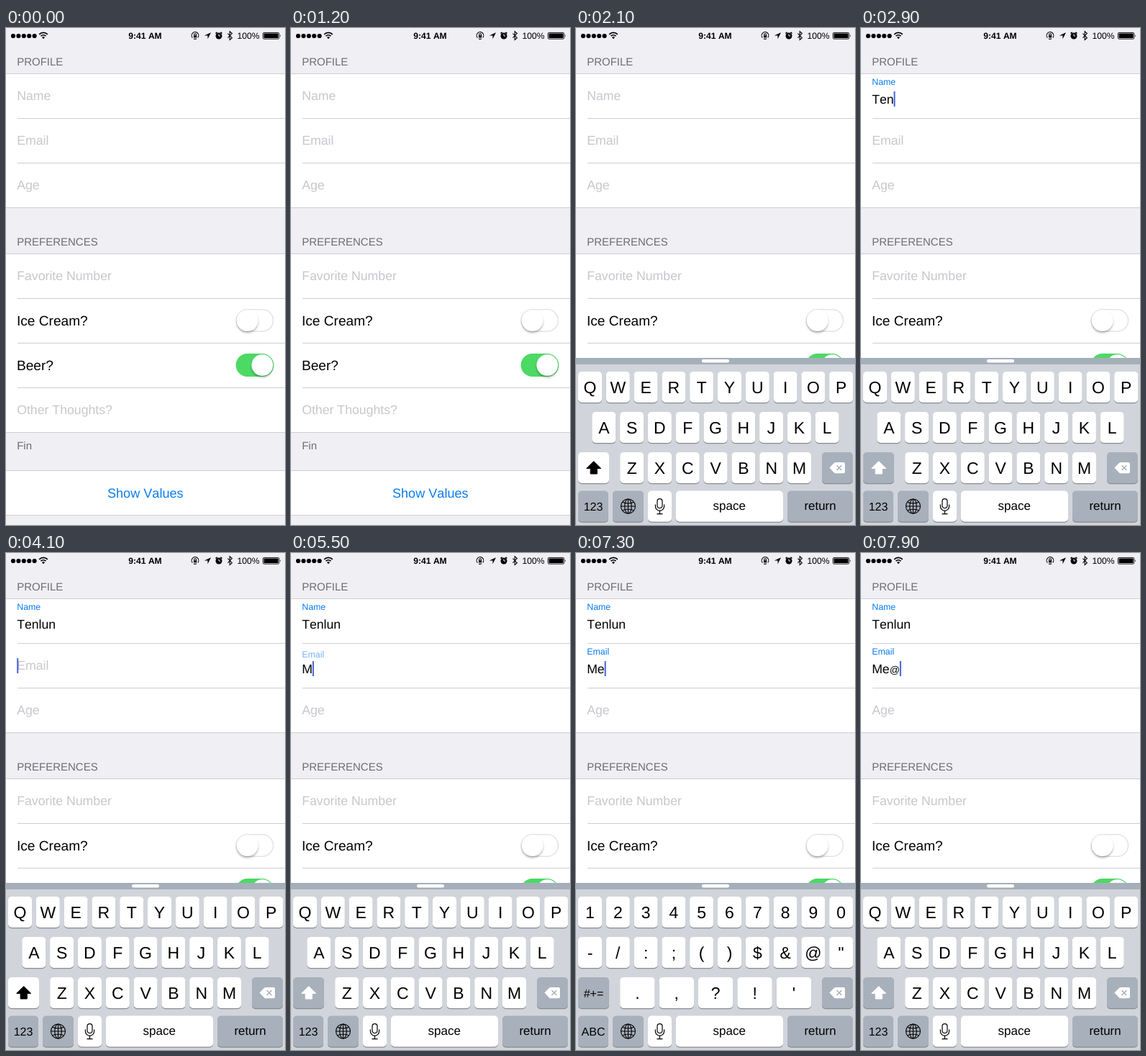
Write an HTML page that moves like this. It is 388x690 px and loops after 8 s.

```html
<!DOCTYPE html>
<html lang="en">
<head>
<meta charset="utf-8">
<title>Form with floating labels</title>
<style>
html, body { margin: 0; width: 100%; height: 100%; overflow: hidden; background: #efeff4; }
svg { display: block; width: 100vw; height: 100vh; }
text { font-family: "Liberation Sans", Arial, sans-serif; font-kerning: none; text-rendering: geometricPrecision; white-space: pre; }
</style>
</head>
<body>
<svg id="stage" viewBox="0 0 388 690"></svg>
<script>
const LOOP = 8000;
const KEY_W = 33, KEY_H = 43, PITCH = 38.8;
const ROWS = [477, 533, 589, 642.5];
const KEY_DARK = '#a8b0bb', BLUE = '#0a7cf0';

const clamp = v => Math.max(0, Math.min(1, v));
const $ = id => document.getElementById(id);
const label = (x, y, size, fill, str, extra = '') =>
  `<text x="${x}" y="${y}" font-size="${size}" fill="${fill}" ${extra}>${str}</text>`;
const box = (x, y, w, h, fill, extra = '') =>
  `<rect x="${x}" y="${y}" width="${w}" height="${h}" fill="${fill}" ${extra}/>`;
const middle = 'text-anchor="middle"';
const escape = c => c.replace('&', '&amp;').replace('"', '&quot;');

// Status bar
function statusBar() {
  const dots = [0, 1, 2, 3, 4].map(i => `<circle cx="${10 + i * 7.4}" cy="11" r="3.1"/>`).join('');
  return `<g fill="#000">${dots}
    <path d="M52 15.2l-2-2.3a3 3 0 0 1 4 0z"/>
    <g fill="none" stroke="#000" stroke-width="1.7">
      <path d="M48.5 11.2a5 5 0 0 1 7 0M46.2 8.8a8.2 8.2 0 0 1 11.6 0"/>
      <path stroke-width="1.1" d="M259.4 13.6a4.8 4.8 0 1 1 7.4-.3M265 14.8a4.8 4.8 0 0 1-4 .3M261.7 10.5v-1.3a1.4 1.4 0 0 1 2.8 0v1.3"/>
      <path stroke-width="1.1" d="M308.4 7.7l6 6-3.2 2.8V4.8l3.2 2.8-6 6"/>
      <path stroke-width="1.5" d="M291.6 7.6l2-1.9M300.4 7.6l-2-1.9"/>
    </g>
    <rect x="261" y="10.2" width="4.2" height="3.2"/>
    <path d="M285 6.2l-9.2 4.4h4.7v4.6z"/>
    <circle cx="296" cy="11" r="4.5"/>
    <path d="M296 8.4V11h2.2" stroke="#efeff4" fill="none"/>
    <rect x="357.4" y="6.4" width="22.4" height="8.8" rx="1.6" fill="none" stroke="#000" stroke-width=".9"/>
    <rect x="358.6" y="7.6" width="20" height="6.4" rx=".6"/>
    <path d="M381 9.2q1.6 1.6 0 3.2z"/>
  </g>`
  + label(193.5, 15, 12.1, '#000', '9:41 AM', middle + ' font-weight="bold"')
  + label(321.5, 15, 12.2, '#000', '100%');
}

// Form
function toggle(y, on) {
  const track = on
    ? box(319.6, y - 16, 52.8, 32, '#4cd964', 'rx="16"')
    : box(320.4, y - 15.2, 51.2, 30.4, '#fff', 'rx="15.2" stroke="#e4e4e4" stroke-width="1.6"');
  const x = on ? 356.4 : 335.6;
  return track + `<circle cx="${x}" cy="${y}" r="14.8" fill="#fff" filter="url(#soft)"/>`;
}

function form() {
  const line = (y, x = 0) => box(x, y, 388 - x, 1, '#cfced3');
  const hint = '#c7c7cd', head = '#6d6d72';
  return box(0, 64, 388, 186, '#fff') + box(0, 314, 388, 248, '#fff') + box(0, 615, 388, 62, '#fff')
    + [63, 249, 313, 561, 614, 676].map(y => line(y)).join('')
    + [125, 187, 375, 437, 499].map(y => line(y, 16)).join('')
    + label(15.2, 51.8, 15, head, 'PROFILE')
    + label(15.2, 301.6, 15, head, 'PREFERENCES')
    + label(15.2, 585, 15, head, 'Fin')
    + label(15.2, 100.4, 17.7, hint, 'Name', 'id="hint0"')
    + label(15.2, 162.4, 17.7, hint, 'Email', 'id="hint1"')
    + label(15.2, 224.4, 17.7, hint, 'Age')
    + label(15.2, 350.4, 17.7, hint, 'Favorite Number')
    + label(15.2, 536.4, 17.7, hint, 'Other Thoughts?')
    + label(15, 413, 19.1, '#000', 'Ice Cream?')
    + label(15, 475, 19.1, '#000', 'Beer?')
    + label(193.8, 652.4, 18.1, BLUE, 'Show Values', middle)
    + toggle(406, false) + toggle(468, true)
    + [0, 1].map(i => label(15.2, 0, 12.4, BLUE, i ? 'Email' : 'Name', `id="tag${i}"`)
      + label(15.2, 104.6 + i * 62, 17.6, '#000', '', `id="value${i}"`)).join('')
    + box(0, 0, 2, 21, '#4363dd', 'id="caret"');
}

// Keyboard
const spots = {};

function key(x, row, w, dark, id = '') {
  const y = ROWS[row];
  return box(x, y + 1.2, w, KEY_H, '#898c91', 'rx="5"')
    + box(x, y, w, KEY_H, dark ? KEY_DARK : '#fff', `rx="5" ${id && `id="${id}"`}`);
}

function keyRow(chars, row, x, w = KEY_W, pitch = PITCH) {
  return [...chars].map((c, i) => {
    const kx = x + i * pitch;
    spots[c] = [kx, ROWS[row]];
    return key(kx, row, w) + label(kx + w / 2, ROWS[row] + 29.6, 23, '#000', escape(c), middle);
  }).join('');
}

function keyboard() {
  const letters = keyRow('QWERTYUIOP', 0, 3) + keyRow('ASDFGHJKL', 1, 22.3)
    + keyRow('ZXCVBNM', 2, 61.2) + key(3, 2, 43, true, 'shift')
    + '<path id="arrow" d="M24.7 601.6l10 9.8h-5.4v7.6h-9.2v-7.6h-5.4z" stroke-linejoin="round" stroke-width="1"/>';
  const symbols = keyRow('1234567890', 0, 3) + keyRow('-/:;()$&@"', 1, 3)
    + keyRow(".,?!'", 2, 61.2, 48.4, 54.4) + key(3, 2, 43, true)
    + label(24.5, 616.5, 16, '#000', '#+=', middle);
  return box(0, 458, 388, 260, '#d1d5db') + box(0, 458, 388, 9, '#a5afba')
    + box(175, 460, 38, 4.4, '#fff', 'rx="2.2"')
    + `<g id="letters">${letters}</g><g id="symbols">${symbols}</g>`
    + key(342, 2, 43, true)
    + `<path d="M352.5 610.6l6.6-6.8q1-.9 2.2-.9h10.7q2 0 2 2v11.4q0 2-2 2h-10.7q-1.2 0-2.2-.9z" fill="#fff"/>
       <path d="M362.6 607.2l6.8 6.8m0-6.8l-6.8 6.8" stroke="${KEY_DARK}" stroke-width="1.5"/>`
    + key(3, 3, 42, true, 'mode') + label(24, 669.6, 16, '#000', '123', middle + ' id="modeName"')
    + key(51, 3, 43, true)
    + `<g fill="none" stroke="#000" stroke-width="1.1"><circle cx="72.5" cy="664" r="10"/>
       <ellipse cx="72.5" cy="664" rx="4.8" ry="10"/>
       <path d="M72.5 654v20M62.5 664h20M64.6 658.2q7.9 3.6 15.8 0M64.6 669.8q7.9-3.6 15.8 0"/></g>`
    + key(100, 3, KEY_W)
    + `<g fill="none" stroke="#000" stroke-width="1.2"><rect x="113" y="653.6" width="7" height="13" rx="3.5"/>
       <path d="M110.4 661.5v2.5a6.1 6.1 0 0 0 12.2 0v-2.5M116.5 670.2v4.2M112.5 674.6h8"/></g>`
    + key(139, 3, 149) + label(213.3, 669.2, 17, '#000', 'space', middle)
    + key(294, 3, 91, true) + label(339.5, 669.2, 16.9, '#000', 'return', middle);
}

$('stage').innerHTML = `<defs><filter id="soft" x="-40%" y="-40%" width="180%" height="190%">
    <feDropShadow dx="0" dy="2.2" stdDeviation="1.8" flood-opacity=".32"/></filter></defs>
  ${box(0, 0, 388, 690, '#efeff4')}${statusBar()}${form()}
  <g id="keyboard">${keyboard()}</g>
  <g id="bubble" filter="url(#soft)"><path fill="#fff"
    d="M-7 -54h47q6 0 6 6v34c0 10-13 10-13 20v32q0 5-5 5h-23q-5 0-5-5v-32c0-10-13-10-13-20v-34q0-6 6-6z"/>
    ${label(KEY_W / 2, -16, 34, '#000', '', middle + ' id="bubbleChar"')}</g>`;

// Typing script
const fields = [
  { focus: 1400, typed: [['T', 2400], ['e', 2600], ['n', 2800], ['l', 3200], ['u', 3400], ['n', 3600]] },
  { focus: 4000, typed: [['M', 5400], ['e', 5800], ['@', 7450]] }
];
const presses = fields.flatMap(f => f.typed);
const SYMBOLS_ON = 6650, SYMBOLS_OFF = 7700, SLIDE_START = 1350;

const show = (id, on) => $(id).setAttribute('display', on ? 'inline' : 'none');
const set = (id, attrs) => { for (const k in attrs) $(id).setAttribute(k, attrs[k]); };

function blink(age) {
  const u = age % 1000;
  return u < 500 ? 1 : u < 850 ? 1 - clamp((u - 500) / 140) : (u - 850) / 150;
}

function draw(t) {
  const s = Math.max(0, t - SLIDE_START) * 0.0247;
  set('keyboard', { transform: `translate(0 ${(232 * (1 + s) * Math.exp(-s)).toFixed(2)})` });

  const active = t >= fields[1].focus ? 1 : 0;
  fields.forEach((f, i) => {
    const done = f.typed.filter(p => t >= p[1]);
    const rise = clamp((t - f.typed[0][1]) / 300);
    const ease = 1 - (1 - rise) ** 2;
    $('value' + i).innerHTML = done.map(p => p[0] === '@' ? '<tspan font-size="14">@</tspan>' : p[0]).join('');
    show('hint' + i, !done.length);
    set('tag' + i, { y: 79 + i * 62 + 9 * (1 - ease), opacity: ease });
    if (i !== active) return;
    const last = done.length ? done[done.length - 1][1] : f.focus;
    const width = done.length ? $('value' + i).getComputedTextLength() : 0;
    set('caret', {
      x: 15.2 + width, y: (done.length ? 88 : 84) + i * 62,
      opacity: t < f.focus ? 0 : blink(t - last)
    });
    const upper = !done.length;
    set('shift', { fill: upper ? '#fff' : KEY_DARK });
    set('arrow', { fill: upper ? '#000' : '#fff', stroke: upper ? '#000' : '#fff' });
  });

  const symbols = t >= SYMBOLS_ON && t < SYMBOLS_OFF;
  show('letters', !symbols);
  show('symbols', symbols);
  $('modeName').textContent = symbols ? 'ABC' : '123';
  const held = [SYMBOLS_ON, SYMBOLS_OFF].some(m => t >= m - 80 && t < m);
  set('mode', { fill: held ? '#fff' : KEY_DARK });

  const press = presses.find(p => t >= p[1] - 130 && t < p[1]);
  show('bubble', !!press);
  if (press) {
    const c = press[0].toUpperCase();
    $('bubbleChar').textContent = c;
    set('bubble', { transform: `translate(${spots[c]})` });
  }
}

const start = performance.now();
function tick() {
  draw((performance.now() - start) % LOOP);
  requestAnimationFrame(tick);
}
draw(0);
requestAnimationFrame(tick);
</script>
</body>
</html>
```
